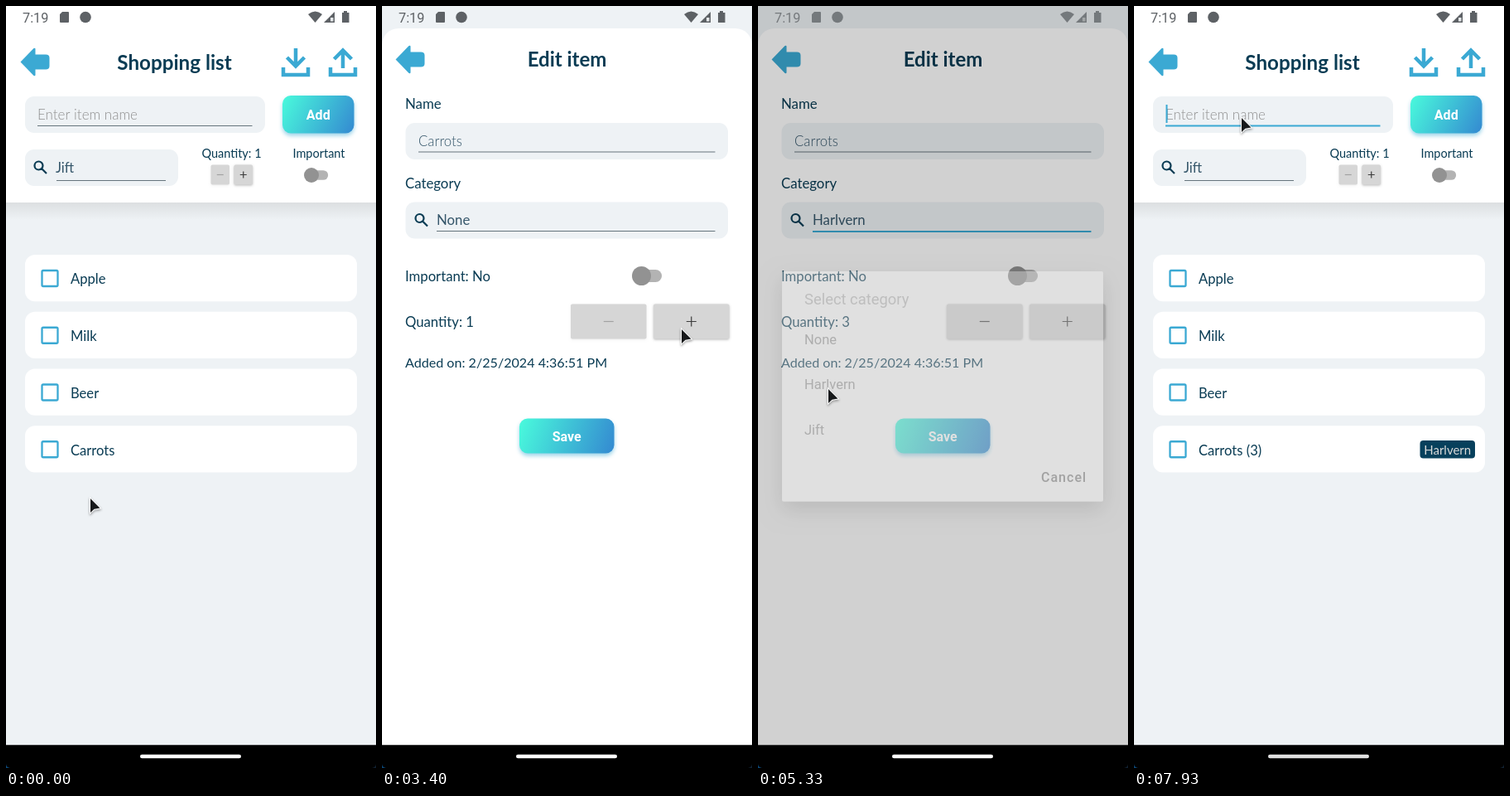
Write an HTML page with a canvas that moves like this. It is 447x919 px and loops after 8000 ms.

```html
<!DOCTYPE html>
<html lang="en">
<head>
<meta charset="utf-8">
<title>Shopping list</title>
<style>
html, body { margin: 0; width: 100%; height: 100%; overflow: hidden; background: #fff; }
canvas { display: block; width: 447px; height: 919px; }
</style>
</head>
<body>
<canvas id="stage" width="447" height="919"></canvas>
<script>
const LOOP = 8000, W = 447, H = 919, NAV_TOP = 891.3;
const INK = '#0a3c54', SOFT_INK = '#35566a', BLUE = '#3ba9d3', FIELD = '#eef2f5', LINE = '#66757d', GREY = '#d6d6d6';
const STORE_A = 'Harlvern', STORE_B = 'Jift';
const c = document.getElementById('stage').getContext('2d');

// Cursor tip: [time, x, y]
const cursorPath = [
  [0, 101, 593], [130, 101, 593], [470, 402, 699], [1600, 402, 699], [1930, 235, 557],
  [2740, 235, 557], [3070, 334, 407], [3130, 334, 407], [3200, 361, 389], [3730, 361, 389],
  [4000, 172, 243], [4640, 172, 243], [5000, 84, 461], [5470, 84, 461], [5870, 225, 514],
  [7070, 225, 514], [7730, 129, 134], [LOOP, 129, 134]
];

const clamp = v => Math.min(1, Math.max(0, v));
const progress = (t, start, length) => clamp((t - start) / length);
const easeOut = p => 1 - (1 - p) ** 4;
const smooth = p => p * p * (3 - 2 * p);
const dialogShown = t => easeOut(progress(t, 4340, 220)) * (1 - progress(t, 5230, 150));

function text(str, x, y, size = 16.6, { color = INK, weight = 400, font = 'Lato', align = 'left', spacing = 0 } = {}) {
  c.font = `${weight} ${size}px ${font}, sans-serif`;
  c.textAlign = align;
  c.letterSpacing = spacing + 'px';
  c.fillStyle = color;
  c.fillText(str, x, y + size * 0.35);
}

function box(x, y, w, h, r, color) {
  c.fillStyle = color;
  c.beginPath();
  c.roundRect(x, y, w, h, r);
  c.fill();
}

function disc(x, y, r, color) {
  c.fillStyle = color;
  c.beginPath();
  c.arc(x, y, r, 0, 7);
  c.fill();
}

function shape(path, color) {
  c.fillStyle = color;
  c.fill(new Path2D(path));
}

function stroke(path, color, width) {
  c.strokeStyle = color;
  c.lineWidth = width;
  c.stroke(new Path2D(path));
}

function withShadow(color, blur, dy, draw) {
  c.save();
  c.shadowColor = color;
  c.shadowBlur = blur;
  c.shadowOffsetY = dy;
  draw();
  c.restore();
}

function backArrow(x, y) {
  c.save();
  c.translate(x, y);
  shape('M-.5 0 15.500-16.500Q17.500-17.500 17.500-15.500V-9H30Q34.500-9 34.500-5V5Q34.500 9 30 9H17.500V15.500Q17.500 17.500 15.500 16.500Z', BLUE);
  c.restore();
}

function search(x, y) {
  c.save();
  c.translate(x, y);
  stroke('M3-2.500A5 5 0 1 1-7-2.500A5 5 0 1 1 3-2.500M1.500 1 7.500 7', INK, 2.2);
  c.restore();
}

function toggle(x, y, r, length) {
  box(x - r * 0.65, y - r * 0.65, length, r * 1.3, r * 0.65, '#b3b3b3');
  disc(x, y, r, '#929292');
}

function stepper(x, y, w, h, arm, { plus, enabled = true, color = GREY }) {
  withShadow(enabled ? '#0004' : '#0001', 3, 1, () => box(x, y, w, h, 2, color));
  const mx = x + w / 2, my = y + h / 2;
  stroke(`M${mx - arm} ${my}h${2 * arm}` + (plus ? `M${mx} ${my - arm}v${2 * arm}` : ''), enabled ? '#3c3c3c' : '#a2a2a2', 1.2);
}

function gradientButton(label, x, y, w, h) {
  const g = c.createLinearGradient(x, y, x + w, y + h);
  g.addColorStop(0, '#49fbdc');
  g.addColorStop(1, '#3489d1');
  withShadow('#3ba9d380', 5, 3, () => box(x, y, w, h, 10, g));
  text(label, x + w / 2, y + h / 2 + 0.5, 16, { color: '#fff', weight: 700, font: 'Roboto', align: 'center' });
}

function underline(x1, x2, y, focused) {
  stroke(`M${x1} ${y}H${x2}`, focused ? BLUE : LINE, focused ? 2 : 1);
}

function statusBar(alpha) {
  const color = '#5d6165';
  c.globalAlpha = alpha;
  text('7:19', 20, 14, 16.3, { color, font: 'Roboto' });
  shape('M68 7H75Q76 7 76 8V19Q76 20 75 20H66Q65 20 65 19V10Z', color);
  disc(96, 13.5, 6.8, color);
  shape('M365 10Q373.500 3 382 10L373.500 20Z', color);
  shape('M397 7V20H384Z', color);
  shape('M392 14H395.500V18.500H392Z', '#e4e7e9');
  shape('M406 8H408V6H412V8H414.500V20H406Z', color);
  c.globalAlpha = 1;
}

function listPage(edited, focused) {
  c.fillStyle = FIELD;
  c.fillRect(0, 0, W, H);
  const shade = c.createLinearGradient(0, 237, 0, 258);
  shade.addColorStop(0, '#dcdfe1');
  shade.addColorStop(1, FIELD);
  c.fillStyle = shade;
  c.fillRect(0, 237, W, 21);
  c.fillStyle = '#fff';
  c.fillRect(0, 0, W, 237);

  backArrow(18, 67.5);
  text('Shopping list', 203.5, 68.5, 24.2, { weight: 700, align: 'center' });
  for (const x of [333, 390]) stroke(`M${x + 2} 74V83H${x + 32}V74`, BLUE, 4.5);
  stroke('M350 51V72M339.500 62 350 72.500 360.500 62', BLUE, 4.5);
  stroke('M407 75V54M396.500 64 407 53.500 417.500 64', BLUE, 4.5);

  box(23, 109, 290, 44, 11, FIELD);
  text('Enter item name', 38, 131, 17, { color: '#8f8f8f', weight: 300 });
  underline(38, 297.5, 144.5, focused);
  if (focused) stroke('M39.500 119V141', BLUE, 2);
  gradientButton('Add', 334, 108, 86.5, 45.5);

  box(23, 173, 185, 44, 11, FIELD);
  search(41.5, 195);
  text(STORE_B, 60, 195, 16.6, { color: SOFT_INK });
  underline(61, 193, 210.5);
  text('Quantity: 1', 272.5, 178, 14.5, { align: 'center' });
  stepper(247.5, 191.5, 22.5, 24, 4, { enabled: false });
  stepper(275.5, 191.5, 22.5, 24, 4, { plus: true });
  text('Important', 378, 178, 14.5, { align: 'center' });
  toggle(369, 204, 9, 26);

  ['Apple', 'Milk', 'Beer', edited ? 'Carrots (3)' : 'Carrots'].forEach((name, i) => {
    const y = 300 + i * 68.75;
    box(23, y, 401, 56.3, 12, '#fff');
    c.strokeStyle = BLUE;
    c.lineWidth = 2.3;
    c.beginPath();
    c.roundRect(43.5, y + 19, 19, 19, 1.5);
    c.stroke();
    text(name, 78, y + 29.5);
  });
  if (edited) {
    box(345.5, 524, 66.5, 21.5, 4, '#07405c');
    text(STORE_A, 378.7, 535.5, 15, { color: '#d9d9d9', align: 'center' });
  }
}

function editPage(t) {
  const quantity = t < 3470 ? 1 : t < 3670 ? 2 : 3;
  const press = progress(t, 3400, 130) * (1 - progress(t, 4340, 300));
  const shade = Math.round(214 - 15 * press);
  const focused = t >= 4200;
  c.fillStyle = FIELD;
  c.fillRect(0, 27, W, H);
  box(0, 27, W, H, 20, '#fff');

  backArrow(17, 64.5);
  text('Edit item', 223.5, 65, 24, { weight: 700, align: 'center' });
  text('Name', 28, 118.5, 16.8);
  box(28.5, 141, 389.5, 44, 11, FIELD);
  text('Carrots', 44, 163, 16.8, { color: SOFT_INK, weight: 300 });
  underline(44, 402.5, 176);

  text('Category', 28, 214, 16.8);
  box(28.5, 236.5, 389.5, 44, 11, FIELD);
  search(47.5, 258.5);
  text(t < 5230 ? 'None' : STORE_A, 66, 258.5, 16.8, { color: SOFT_INK });
  underline(66, 402.5, focused ? 272 : 271.5, focused);

  text('Important: No', 28, 326, 16.7);
  toggle(313.5, 325.5, 11.5, 32);
  text(`Quantity: ${quantity}`, 28, 381, 16.7);
  stepper(228, 359.5, 91.5, 42, 6, { enabled: quantity > 1 });
  stepper(328, 359.5, 91.5, 42, 6, { plus: true, color: `rgb(${shade},${shade},${shade})` });
  text('Added on: 2/25/2024 4:36:51 PM', 28, 430.5, 16.1);
  gradientButton('Save', 166, 497.5, 114.5, 42);
}

function dialog(t) {
  const shown = dialogShown(t);
  if (!shown) return;
  c.fillStyle = `rgba(0,0,0,${0.55 * shown})`;
  c.fillRect(0, 0, W, NAV_TOP);
  c.save();
  c.globalAlpha = shown;
  // The shadow falls outside the panel only, so the fading panel stays clean.
  c.save();
  c.clip(new Path2D(`M0 0H${W}V${NAV_TOP}H0ZM29 320H417V597.500H29Z`), 'evenodd');
  withShadow('#0005', 26, 10, () => box(29, 320, 388, 277.5, 2, '#fff'));
  c.restore();
  box(29, 320, 388, 277.5, 2, '#fff');
  const roboto = { font: 'Roboto', color: '#444' };
  text('Select category', 56, 354, 18.4, { ...roboto, color: '#777' });
  ['None', STORE_A, STORE_B].forEach((name, i) => text(name, 56, 402 + i * 54.6, 16.5, roboto));
  text('Cancel', 342, 568.5, 16, { ...roboto, color: '#222', weight: 500, spacing: 1 });
  c.restore();
}

function navBar(t, sliding) {
  const grey = t < 6500 ? 255 : 176 + 48 * progress(t, 6730, 340);
  c.fillStyle = '#0b4a7c';
  c.fillRect(0, 914, 5, 5);
  c.fillStyle = '#123';
  c.fillRect(W - 5, 914, 5, 5);
  box(0, NAV_TOP, W, H - NAV_TOP, [0, 0, 5, 5], sliding ? '#fff' : '#000');
  box(162, 902.7, 122, 4.6, 2.3, sliding ? '#ececec' : `rgb(${grey},${grey},${grey})`);
}

function cursor(t) {
  const i = cursorPath.findIndex(p => p[0] > t);
  const [t0, x0, y0] = cursorPath[i - 1], [t1, x1, y1] = cursorPath[i];
  const p = smooth(progress(t, t0, t1 - t0));
  c.save();
  c.translate(x0 + (x1 - x0) * p, y0 + (y1 - y0) * p);
  const arrow = 'M1 1V18L5.500 13.800 12.500 12.500Z';
  withShadow('#0006', 3, 1.5, () => stroke(arrow, '#fff', 2));
  shape(arrow, '#17191b');
  c.restore();
}

function draw(t) {
  c.clearRect(0, 0, W, H);
  const opening = t >= 2330 && t < 2740, closing = t >= 6130 && t < 6520;
  const editing = t >= 2330 && t < 6520;
  if (!editing || opening || closing) listPage(t > 5930, t >= 7930);
  if (editing) {
    const offset = 1 - easeOut(progress(t, 2330, 385)) + easeOut(progress(t, 6130, 385));
    c.save();
    c.translate(0, Math.round(offset * NAV_TOP));
    editPage(t);
    c.restore();
    c.fillStyle = FIELD;
    c.fillRect(0, 0, W, 27);
  }
  statusBar(1 - 0.6 * Math.sqrt(dialogShown(t)));
  dialog(t);
  navBar(t, opening || closing);
  cursor(t);
}

const start = performance.now();
function tick() {
  draw((performance.now() - start) % LOOP);
  requestAnimationFrame(tick);
}
tick();
</script>
</body>
</html>
```
